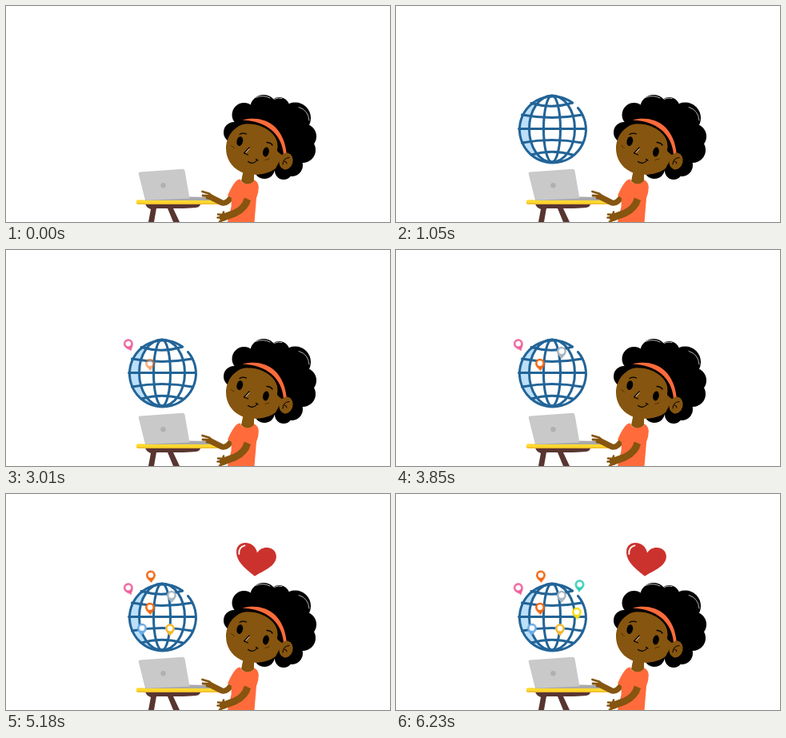
Recreate the animation shown at these times as an HTML page without scripts. Size 480x270 px, loop 6300 ms.

```html
<!DOCTYPE html>
<html lang="en">
<head>
<meta charset="utf-8">
<title>Girl at a laptop</title>
<style>
html, body { margin: 0; width: 100%; height: 100%; overflow: hidden; background: #fff; }
svg { display: block; width: 100vw; height: 100vh; }
.line { fill: none; stroke: #000; stroke-linecap: round; stroke-linejoin: round; }
.skin { fill: #86550f; }
.limb { fill: none; stroke: #86550f; stroke-linecap: round; stroke-linejoin: round; }
.cloth { fill: #ff6b3b; }
.grid { fill: none; stroke: #226497; stroke-width: 3; stroke-linecap: round; }

/* each item fades in over seven 70 ms steps, then stays until the loop ends */
.in { animation: 6.3s linear infinite; }
.globe { animation-name: globe; }
.pink { animation-name: pink; }
.orange { animation-name: orange; }
.grey { animation-name: grey; }
.blue { animation-name: blue; }
.gold { animation-name: gold; }
.heart { animation-name: heart; }
.top { animation-name: top; }
.teal { animation-name: teal; }
.lemon { animation-name: lemon; }
@keyframes globe { 0%, 9.84% { opacity: 0; animation-timing-function: steps(7, start) } 17.62%, to { opacity: 1 } }
@keyframes pink { 0%, 35.4% { opacity: 0; animation-timing-function: steps(7, start) } 43.18%, to { opacity: 1 } }
@keyframes orange { 0%, 44.29% { opacity: 0; animation-timing-function: steps(7, start) } 52.07%, to { opacity: 1 } }
@keyframes grey { 0%, 53.17% { opacity: 0; animation-timing-function: steps(7, start) } 60.95%, to { opacity: 1 } }
@keyframes blue { 0%, 62.06% { opacity: 0; animation-timing-function: steps(7, start) } 69.84%, to { opacity: 1 } }
@keyframes gold { 0%, 65.4% { opacity: 0; animation-timing-function: steps(7, start) } 73.18%, to { opacity: 1 } }
@keyframes heart { 0%, 66.51% { opacity: 0; animation-timing-function: steps(7, start) } 74.29%, to { opacity: 1 } }
@keyframes top { 0%, 74.29% { opacity: 0; animation-timing-function: steps(7, start) } 82.07%, to { opacity: 1 } }
@keyframes teal { 0%, 84.29% { opacity: 0; animation-timing-function: steps(7, start) } 92.07%, to { opacity: 1 } }
@keyframes lemon { 0%, 90.95% { opacity: 0; animation-timing-function: steps(7, start) } 98.73%, to { opacity: 1 } }
</style>
</head>
<body>
<svg viewBox="0 0 480 270">
  <defs>
    <g id="pin">
      <path d="M0 9.6C-1.600 6-5.900 4.200-5.900-.4A5.900 5.900 0 0 1 5.900-.4C5.900 4.200 1.600 6 0 9.600Z"/>
      <circle cy="-.4" r="3.400" fill="#fff"/>
    </g>
  </defs>

  <g class="in globe">
    <path fill="#bce0fa" d="M195 112A41.500 41.500 0 0 0 195 195A28.500 41.500 0 0 1 195 112Z"/>
    <g class="grid">
      <path d="M220.500 121A41.500 41.500 0 1 0 227.500 127.500"/>
      <ellipse cx="195" cy="153.500" rx="28.500" ry="41.500"/>
      <ellipse cx="195" cy="153.500" rx="10.500" ry="41.500"/>
      <path d="M153.500 153.500H236.500M157.500 136Q195 143 232.500 136M157.500 171Q195 164 232.500 171"/>
      <path d="M169 121.500Q195 129 220.500 121M169 186Q195 178.500 221 186"/>
    </g>
  </g>

  <!-- table -->
  <path fill="#583530" d="M174 247H244L241 251Q237 253 209 253L217 270H209L202 253H188L185 270H178L181 254Q175 252 174 247Z"/>
  <rect x="163" y="242.800" width="105" height="5.200" rx="2" fill="#f1b92c"/>
  <rect x="163" y="242.600" width="105" height="4" rx="1.800" fill="#ffd92f"/>

  <!-- laptop -->
  <path d="M229 238.500L257 239Q259 240 259 243H174V241Z" fill="#a9a9ab"/>
  <path d="M168 207.600L220.500 203.800Q223 203.600 223.500 206L229.500 240.500L176 242.800Q174 243 173.500 241L165.800 210Q165.300 207.800 168 207.600Z" fill="#c9c9ca"/>
  <circle cx="196.500" cy="224.300" r="3.200" fill="#b0b0b2"/>

  <!-- hair -->
  <g>
    <ellipse cx="331" cy="164" rx="48" ry="42"/>
    <circle cx="297.500" cy="136" r="15"/>
    <circle cx="322" cy="128" r="17"/>
    <circle cx="341.500" cy="127" r="13"/>
    <circle cx="361.500" cy="140" r="19.500"/>
    <circle cx="372" cy="163" r="16"/>
    <circle cx="371" cy="180" r="16"/>
    <circle cx="357" cy="199" r="14"/>
    <circle cx="347" cy="206" r="11"/>
    <circle cx="323" cy="203" r="13"/>
    <circle cx="285" cy="158" r="13"/>
    <path d="M312 114.500Q321 110.500 330 115M366 126.500Q378 130 379 143M335 116.500Q340 114 345 115.500" fill="none" stroke="#fff" stroke-width=".7" stroke-linecap="round"/>
  </g>

  <!-- body -->
  <path class="limb" d="M283 237Q276 248 270 246L257 239.500" stroke-width="7"/>
  <path class="limb" d="M260 239.500L254 234.500L245.500 232M256 237.500L246 237M258 241L251 240" stroke-width="2.800"/>
  <path class="skin" d="M297 204L294 219Q302 227 310 219V206Z"/>
  <path class="cloth" d="M293 216.500Q294 222 301 222.500Q308 222.500 310.500 217.500Q315.500 220 315.800 226Q316 233 313 240L310.500 270H277L281.500 251L282 240L277 237Q283 223 288 218.500Q290 216.500 293 216.500Z"/>
  <path class="limb" d="M302 241Q299 253 286 259L271 264.500" stroke-width="9"/>
  <path class="limb" d="M273 261L265 260.500M272 264L264.500 264.500M273 267L267 269.500M271 261L272 257.500" stroke-width="2.600"/>
  <path class="cloth" d="M300 228Q310 224 315 230Q314 238 309.500 244.500L296.500 239Z"/>

  <!-- head -->
  <path class="skin" d="M296 148C284 152 275 164 275 178C275 190 281 201 293 207C305 213 326 212 337 203L346 186L339 180Q341 171 336 163C328 151 311 144 296 148Z"/>
  <path d="M292 147Q303 139 321 142Q345 152 349 187Q344 187 339 181Q342 172 336 163Q325 149 306 147.500Z"/>
  <path d="M295.500 142.500C319 136 348 146 351 187L347 186C345 160 326 144 295.500 142.500Z" fill="#ff6b3b"/>
  <ellipse class="skin" cx="350" cy="194" rx="8.500" ry="10.500" transform="rotate(15 350 194)"/>
  <path class="line" d="M346 198Q346 190 354 189.500M348 194Q351 194 351 197" stroke-width="1"/>
  <ellipse cx="292.300" cy="169" rx="3.800" ry="6" transform="rotate(12 292 169)"/>
  <ellipse cx="324.800" cy="182.500" rx="3.800" ry="6" transform="rotate(12 325 183)"/>
  <path class="line" d="M292 160.500Q296 158 300.500 160M326 170.500Q330.500 170.500 333 174" stroke-width="1.300"/>
  <path class="line" d="M304 177L297.500 184L302.500 186" stroke-width="1.200"/>
  <path d="M304 178.500L300 183" stroke="#fff" stroke-width=".8" stroke-linecap="round"/>
  <path class="line" d="M302.500 194.500Q309 199 314 192.500M312.500 191.500L315 193" stroke-width="1.200"/>
  <path d="M281.500 174.500L285.500 177.500M324 192.500L329 191" stroke="#4a2d05" stroke-width=".9" stroke-linecap="round"/>

  <!-- pins -->
  <g class="in pink" fill="#ed609b"><use href="#pin" transform="translate(153 117.500) rotate(-22)"/></g>
  <g class="in orange" fill="#f2660f"><use href="#pin" transform="translate(180 142) rotate(-4)"/></g>
  <g class="in grey" fill="#a9b7c2"><use href="#pin" transform="translate(207 127)"/></g>
  <g class="in blue" fill="#69aae4"><use href="#pin" transform="translate(170 168) rotate(5)"/></g>
  <g class="in gold" fill="#f5b82e"><use href="#pin" transform="translate(205 168.500)"/></g>
  <g class="in top" fill="#f2660f"><use href="#pin" transform="translate(181 101.800) rotate(-4)"/></g>
  <g class="in teal" fill="#35cdb9"><use href="#pin" transform="translate(229.500 113.500) rotate(4)"/></g>
  <g class="in lemon" fill="#f6dc12"><use href="#pin" transform="translate(226 148) rotate(-6)"/></g>

  <g class="in heart">
    <path d="M311 102.800C303 96 288 86 288 72.500C288 65 293 61 299 61C307 61 312.500 66 314 73.500C317 68.500 322 66.500 327 67C334 67.500 338.500 73 337.800 79.500C336.500 91 321 96 311 102.800Z" fill="#cc322d"/>
    <path d="M291.300 75Q290.500 66 298.500 64.300" fill="none" stroke="#fff" stroke-width="1.800" stroke-linecap="round"/>
  </g>
</svg>
</body>
</html>
```
